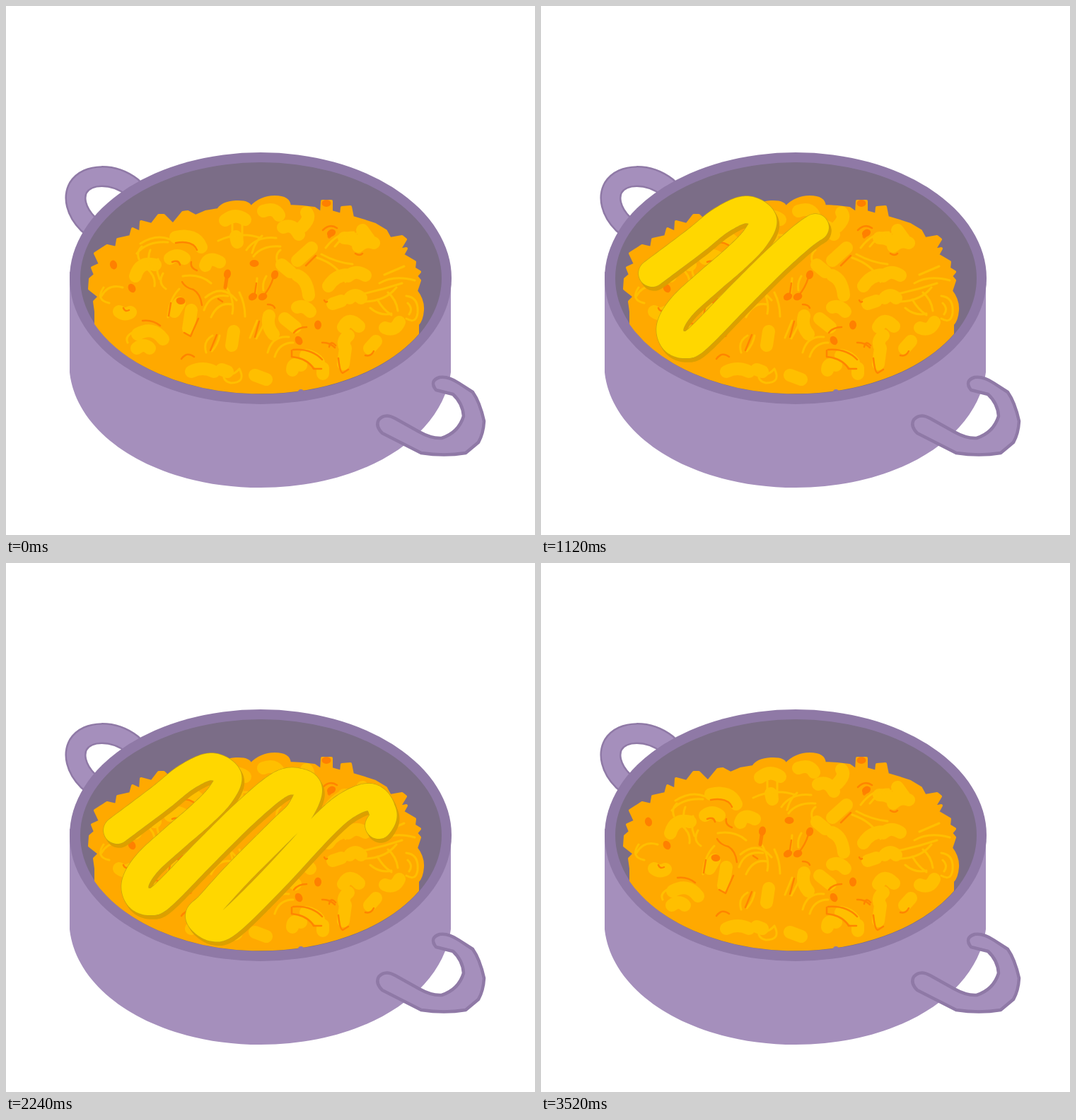
An HTML page that plays this animation: 748x748 px, repeating every 4800 ms.

```html
<!DOCTYPE html>
<html lang="en">
<head>
<meta charset="utf-8">
<title>Macaroni pot</title>
<style>
html, body { margin: 0; width: 100%; height: 100%; overflow: hidden; background: #fff; }
svg { display: block; width: 100vw; height: 100vh; }
.line { fill: none; stroke-linecap: round; stroke-linejoin: round; }
.thick { stroke: #ffbf00; stroke-width: 18; }
.thin { stroke: #ffbf00; stroke-width: 3; }
.red { stroke: #ff8500; stroke-width: 2.5; }
</style>
</head>
<body>
<svg viewBox="0 0 748 748">
  <!-- pot -->
  <g class="line">
    <path id="loop" d="M116 308C98 290 95 270 102 257C115 236 152 236 178 256" stroke="#8f79a6" stroke-width="30"/>
    <path d="M116 308C98 290 95 270 102 257C115 236 152 236 178 256" stroke="#a58fbc" stroke-width="25"/>
  </g>
  <path d="M90 376V518C100 610 215 681 360 681S617 610 629 518V376Z" fill="#a58fbc"/>
  <ellipse cx="360" cy="385" rx="270" ry="178" fill="#8f79a6"/>
  <ellipse cx="360.5" cy="385" rx="255.5" ry="164" fill="#7b6d87"/>

  <!-- pasta bed -->
  <path fill="#ffa900" stroke="#ffa900" stroke-width="4" stroke-linejoin="round" d="M127 449L127 432L125 418L132 411L118 400L119 386L126 380L122 370L133 365L126 350L143 339L156 342L158 330L176 326L179 315L190 320L191 305L206 309L216 296L223 296L236 309L250 292L257 291L268 297L282 291L300 288Q306 278 325 277T346 285Q360 270 380 270T401 283L419 284L436 286L446 293L447 276L460 276L460 291L474 295L475 285L487 284L490 299L507 304L522 309L537 318L543 329L560 326L565 330L556 345L566 343L561 352L578 362L577 371L585 376L580 382L585 388L580 403Q590 416 589 430T582 450V463A255 164 0 0 1 127 449Z"/>

  <g class="line thick">
    <path d="M310 303q14-11 28-1M364 290q16-6 22 6M392 313q14-6 22 10M425 292q6 8-6 20M240 327q28-6 36 14M183 382q6-22 28-16M232 357q10-8 20 0M282 367q4-14 20-5M504 317l10 14M498 340q10-10 22-5M478 328q14 0 20 8M412 360l20-18M484 382q10-10 24-1M456 396q10-16 28-16M412 381q14 6 16 28M325 326l2 8M390 366l12 10"/>
    <path d="M477 454q8-16 22-1M536 455q14 6 20-8M484 466q-10 8-4 18l-3 22M405 515q0-12 12-7M352 522l16 6M185 484q10-8 18 0M186 464q22-12 36 7M160 432q8 6 16 1M238 432l7-12M262 430l-4 26M322 460l-3 20M262 517q16-8 32 0M305 514l8 3M372 438q-4 14 6 26M412 426q10-4 18 6M394 442l15 12M424 494q12 2 18 10M514 484l9-10M486 413q8-8 16 0M462 421l12-4M448 520l0-8"/>
  </g>
  <g class="line thin">
    <path d="M190 336q22-14 42-6M185 350q14-18 44-16M192 340q-8 8-4 18M204 345q-6 14 4 28M215 358q-4 14 2 28M146 420q-20-4-8-22M135 410q10-18 30-12M200 372q12 10 10 24M222 378q-8 14 4 22M300 332q30-14 60-4M320 308v24M334 308v22M340 345q14-20 42-17M350 354q12-16 38-14M362 325q-10 8-14 24M388 345q-8 6-4 18"/>
    <path d="M440 356q30 10 40 34M446 351q22 12 44 14M465 340q10-14 30-18M452 342q16-22 40-22M355 385l-2 22M368 382q-6 10-4 20M282 412q24-20 44 4M280 430q8-24 34-20M290 440q10-22 30-18M310 395q14 20 10 40M330 405q8 16 8 34M245 400q-14 14-16 40M355 445l-10 24M370 440l-16 30M330 513q10 20-12 20q-12-2-10-14q12 6 22-6"/>
    <path d="M370 490q6-24 30-22M380 496q6-20 26-20M500 408q30-6 60-16M506 418q30 0 46-20M515 427q14 12 30 8M525 415q8 14 20 22M540 405q12 10 14 26M528 392q20-12 50-4M566 410q18 2 16 24q-2 16-16 8M568 420q8 8 2 16M535 380l28-12M292 466q-14 8-9 24M302 466q-2 12-11 22M178 462q-10 6-6 14M250 382q24-4 40 10"/>
  </g>
  <g class="line red">
    <path d="M240 335q24-4 30 10M235 362q9-4 11 4M262 362q-2 8 8 12M249 390q4 8 16 11q10 6 12 22M193 445q14-2 25 7M166 427q2 6 8 3M233 420l-3 18M272 442l-11 25l-9-5M298 465l-9 22M248 499q8-11 18-3M358 446l-6 22M300 414l6 4"/>
    <path d="M404 487v9q22 2 31 17l11 0M406 486q26-2 41 14M407 462q6-8 18-8M447 476q10-1 18 7M457 482q2-10 9-2M470 498q2 20 6 21l8-5M508 494q8 2 12-6M424 367l14-14M494 350q6 4 10 0M450 416q2 4 4 2M448 317q10-10 20-3M378 384q-4 14-14 26M370 422q8 0 10 5M354 392l-2 14"/>
    <path d="M312 385l-2 13M463 320l-6 6" stroke-width="5" style="stroke-width:5"/>
  </g>
  <g id="holes" fill="#ff8000"></g>
  <circle cx="417" cy="546" r="4" fill="#8f79a6"/>

  <!-- front handle -->
  <path fill="#a58fbc" stroke="#8f79a6" stroke-width="4.5" stroke-linejoin="round" d="M613 525Q625 523 640 533L660 546Q670 560 676 587Q675 605 668 617L650 632Q620 637 587 632L532 604Q522 594 527 585Q536 575 550 583L584 602Q602 612 616 611Q640 603 647 580Q646 562 632 549L608 543Q598 530 613 525Z"/>

  <g id="cheese" class="line">
    <polyline stroke="#dca000" transform="translate(3 5)"/>
    <polyline stroke="#c9a60c"/>
    <polyline stroke="#ffd700"/>
  </g>
</svg>
<script>
const LOOP = 4800, STEP = 80, CLEAR = 3520, SUB = 14;

// x, y, tilt in degrees
const holes = [
  [152, 366, -15], [178, 399, -30], [313, 379, 10], [351, 364, 90], [380, 380, 20], [349, 411, 60],
  [363, 411, 70], [247, 417, 100], [441, 451, 0], [414, 473, -30], [460, 321, 60], [453, 279, 90]
];
document.getElementById('holes').innerHTML = holes.map(([x, y, a]) =>
  `<ellipse rx="5" ry="6.5" transform="translate(${x} ${y}) rotate(${a})"/>`).join('');

// centre line of the squeezed cheese
const knots = [
  [157, 378], [217, 333], [255, 303], [290, 288], [314, 302], [303, 328], [275, 357],
  [238, 389], [200, 424], [183, 452], [187, 472], [203, 479], [222, 470], [281, 410], [340, 352], [388, 313],
  [416, 310], [428, 322], [415, 352], [390, 377], [330, 437], [288, 483],
  [273, 500], [293, 516], [318, 506], [380, 445], [450, 370], [485, 341], [515, 331], [531, 347], [527, 371],
  [468, 430], [428, 485], [437, 503], [458, 503], [520, 462], [543, 442], [555, 432]
];
// [time, knot reached by the tip]
const keys = [[0, 0], [480, 6], [1120, 15], [1520, 21], [2240, 30], [2800, 36], [3040, 37]];

const knot = i => knots[Math.max(0, Math.min(knots.length - 1, i))];
const spline = (a, b, c, d, u) =>
  b + u / 2 * (c - a + u * (2 * a - 5 * b + 4 * c - d + u * (3 * (b - c) + d - a)));

const line = [];
for (let i = 0; i <= (knots.length - 1) * SUB; i++) {
  const k = Math.floor(i / SUB), u = i % SUB / SUB;
  const p = [-1, 0, 1, 2].map(o => knot(k + o));
  line.push([0, 1].map(c => spline(...p.map(q => q[c]), u)));
}
const dist = [0];
for (let i = 1; i < line.length; i++)
  dist[i] = dist[i - 1] + Math.hypot(line[i][0] - line[i - 1][0], line[i][1] - line[i - 1][1]);

function reach(t) {
  for (let i = 1; i < keys.length; i++) {
    const [t0, k0] = keys[i - 1], [t1, k1] = keys[i];
    if (t <= t1) {
      const d0 = dist[k0 * SUB], d1 = dist[k1 * SUB];
      return d0 + (d1 - d0) * (t - t0) / (t1 - t0);
    }
  }
  return dist[dist.length - 1];
}

const cheese = document.getElementById('cheese');
const layers = [...cheese.children];
const start = performance.now();

function draw(now) {
  const t = Math.floor(Math.max(0, now - start) % LOOP / STEP) * STEP;
  const shown = t >= STEP && t < CLEAR;
  cheese.style.display = shown ? '' : 'none';
  if (shown) {
    const len = reach(t);
    const points = line.filter((p, i) => dist[i] <= len + 0.01).join(' ');
    const width = t < 640 ? 41 : 38; // settles after the first bend
    layers.forEach((layer, i) => {
      layer.setAttribute('points', points);
      layer.setAttribute('stroke-width', i < 2 ? width + 1.5 : width);
    });
  }
  requestAnimationFrame(draw);
}
draw(start);
</script>
</body>
</html>
```
